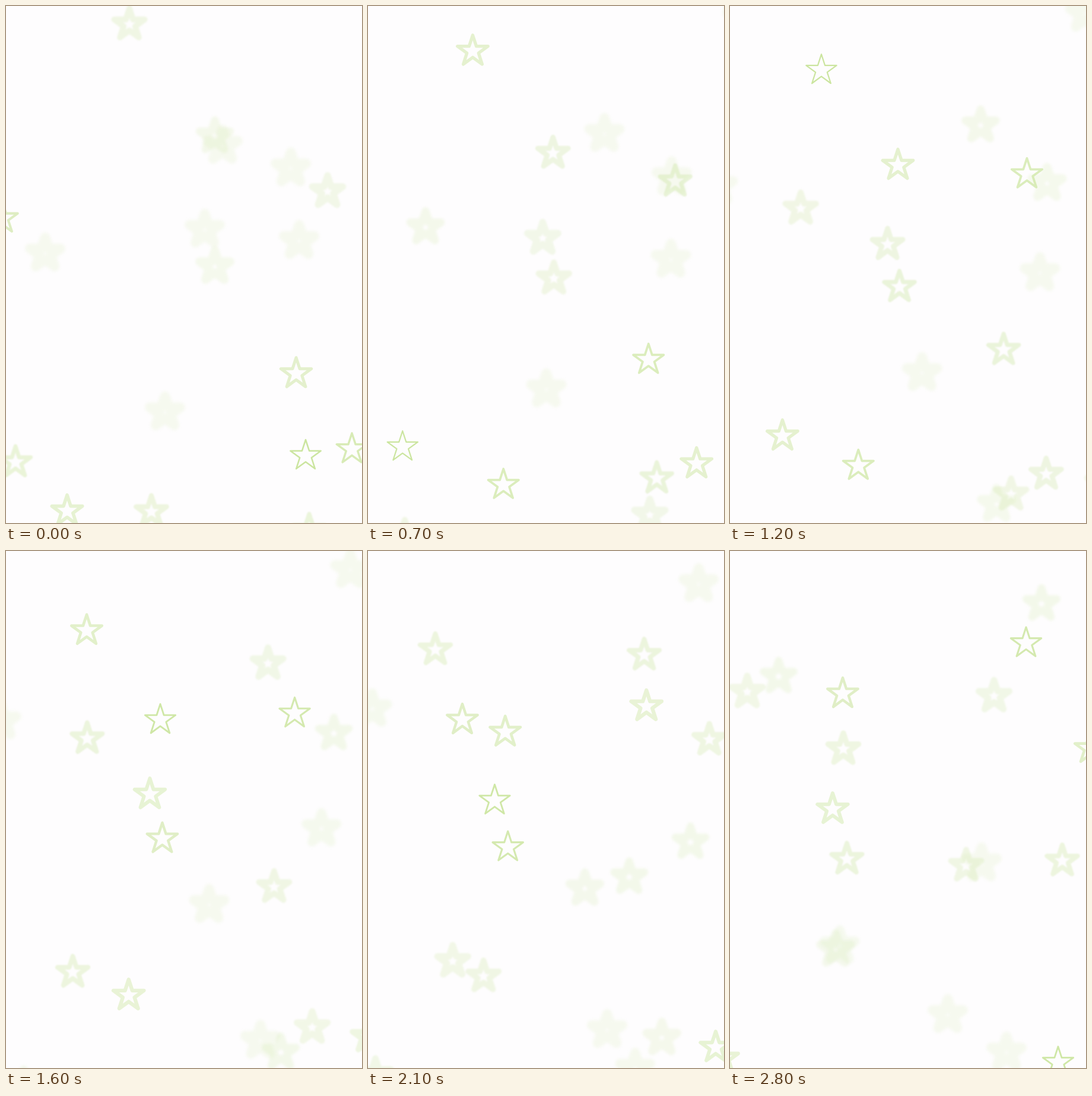
Write an HTML page with a canvas that moves like this. It is 600 by 869 pixels and loops after 2.9 s.

```html
<!DOCTYPE html>
<html lang="en">
<head>
<meta charset="utf-8">
<title>Drifting stars</title>
<style>
  html, body { margin: 0; width: 100%; height: 100%; overflow: hidden; background: #fefdfe; }
  canvas { display: block; }
</style>
</head>
<body>
<canvas id="stage" width="600" height="869"></canvas>
<script>
const WIDTH = 600, HEIGHT = 869;
const LOOP = 2900, STEP = 100, LAST = LOOP - STEP;
const RADIUS = 27, INNER = RADIUS * 0.382;
const LINE = 2.2, INK = 2.6;

// Stars come into focus one after another at a steady pace.
const FIRST_FOCUS = -800, FOCUS_GAP = 250;
const DEFOCUS_SPEED = 4.2 / 1000, MAX_DEFOCUS = 9.5;

// Each star drifts in a straight line: start x, y to end x, y, in order of focus.
const paths = [
  [511, 881, 367, 780],
  [103, 849, -61, 1016],
  [-6, 357, -130, 450],
  [505, 756, 432, 908],
  [583, 745, 466, 843],
  [489, 618, 424, 525],
  [16, 767, 185, 664],
  [245, 850, 178, 670],
  [208, 31, 82, 211],
  [542, 312, 445, 244],
  [352, 219, 191, 333],
  [352, 438, 197, 518],
  [335, 376, 173, 434],
  [66, 416, 190, 240],
  [685, 758, 553, 860],
  [365, 235, 499, 155],
  [480, 273, 607, 332],
  [86, 960, -12, 853],
  [494, 395, 560, 521],
  [268, 683, 398, 529],
  [-58, 352, 29, 237],
  [654, -44, 525, 89]
];

const ctx = document.getElementById("stage").getContext("2d");
const mix = (a, b, u) => a + (b - a) * u;

const starShape = new Path2D();
for (let i = 0; i < 10; i++) {
  const angle = i * Math.PI / 5 - Math.PI / 2;
  const r = i % 2 ? INNER : RADIUS;
  starShape.lineTo(r * Math.cos(angle), r * Math.sin(angle));
}
starShape.closePath();

// Out of focus, the outline spreads into a wider, paler, softer band.
function drawStar(x, y, defocus) {
  const width = LINE + 1.5 * defocus;
  const blur = 0.28 * defocus;
  ctx.setTransform(1, 0, 0, 1, x, y);
  ctx.lineWidth = width;
  ctx.globalAlpha = Math.min(1, INK / width);
  ctx.filter = blur > 0.1 ? `blur(${blur.toFixed(2)}px)` : "none";
  ctx.stroke(starShape);
}

function clear() {
  ctx.setTransform(1, 0, 0, 1, 0, 0);
  ctx.globalAlpha = 1;
  ctx.filter = "none";
  ctx.fillStyle = "#fefdfe";
  ctx.fillRect(0, 0, WIDTH, HEIGHT);
}

function render(elapsed) {
  const ms = Math.floor((elapsed % LOOP) / STEP) * STEP;
  clear();
  ctx.strokeStyle = "#cbe59f";
  ctx.lineJoin = "round";
  paths.forEach(([x0, y0, x1, y1], i) => {
    const focus = FIRST_FOCUS + i * FOCUS_GAP;
    const defocus = Math.min(MAX_DEFOCUS, DEFOCUS_SPEED * Math.abs(ms - focus));
    drawStar(mix(x0, x1, ms / LAST), mix(y0, y1, ms / LAST), defocus);
  });
}

const begin = performance.now();
function tick() {
  render(performance.now() - begin);
  requestAnimationFrame(tick);
}
tick();
</script>
</body>
</html>
```
